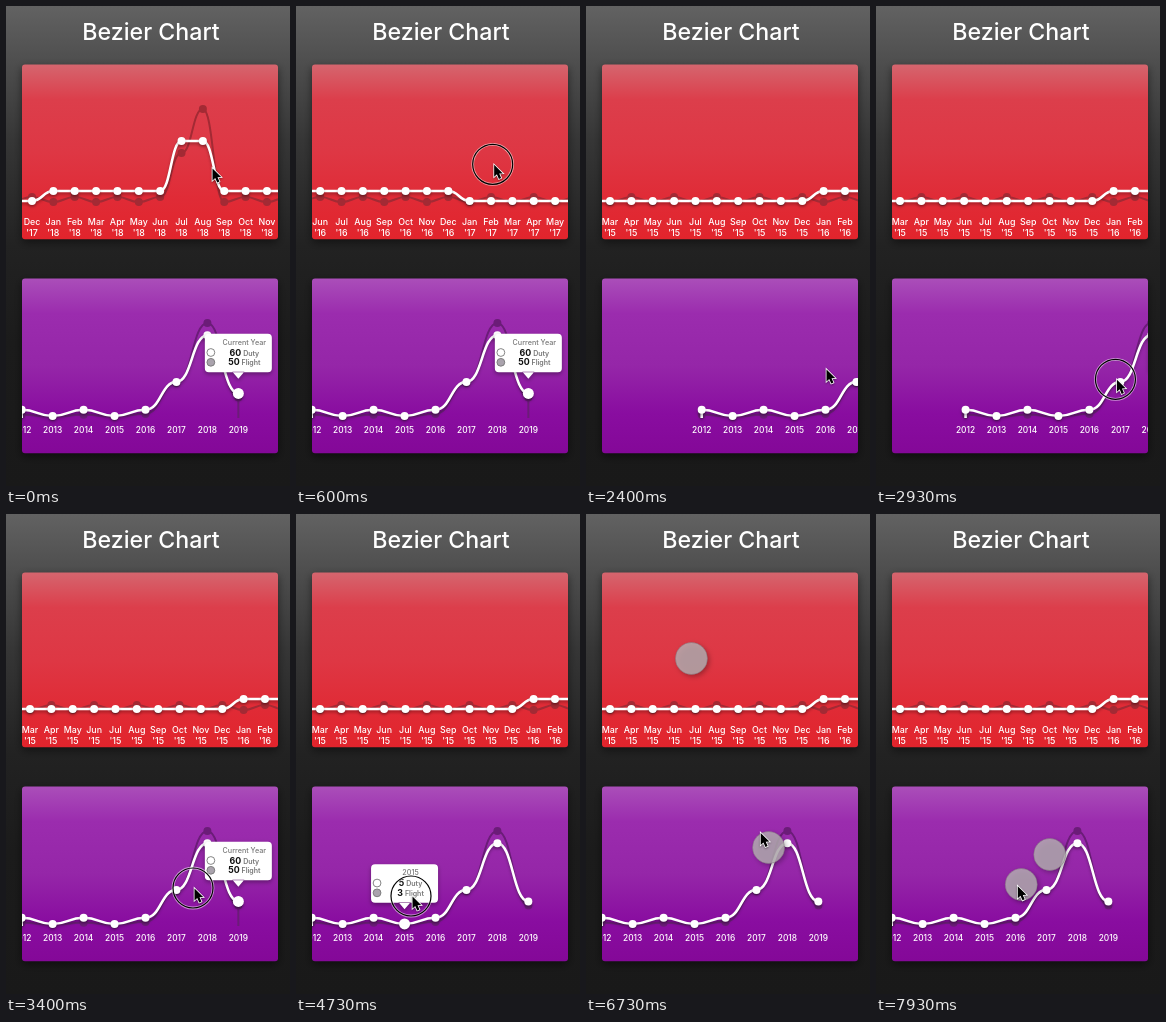
Animation, 284 px wide and 480 px high, one loop 8000 ms. Source, as an HTML page with a canvas:

```html
<!DOCTYPE html>
<html lang="en">
<head>
<meta charset="utf-8">
<title>Bezier Chart</title>
<style>
  html, body { margin: 0; width: 100%; height: 100%; overflow: hidden; background: #1b1b1b; }
  canvas { display: block; width: 284px; height: 480px; }
</style>
</head>
<body>
<canvas id="stage"></canvas>
<script>
const W = 284, H = 480, LOOP = 8000;
const canvas = document.getElementById('stage');
const ctx = canvas.getContext('2d');
const scale = window.devicePixelRatio || 1;
canvas.width = W * scale;
canvas.height = H * scale;

const FONT = 'Inter, Roboto, sans-serif';
const MONTHS = 'Jan Feb Mar Apr May Jun Jul Aug Sep Oct Nov Dec'.split(' ');

const mix = (a, b, u) => a + (b - a) * u;
const progress = (t, from, to) => Math.min(1, Math.max(0, (t - from) / (to - from)));
const ease = (t, from, to) => {
  const u = progress(t, from, to);
  return u * u * (3 - 2 * u);
};

// Two swipes over the months, then eased moves between a few spots
const SWIPE = 656.7, SWIPE_END = 2 * SWIPE, HOLD = 130;
const MOVES = [
  { from: 1470, to: 1800, x: 140, y: 373 },
  { from: 1850, to: 2200, x: 239, y: 363, pressed: true },
  { from: 2450, to: 2650, x: 262, y: 373 },
  { from: 2720, to: 3300, x: 187, y: 374, pressed: true },
  { from: 3670, to: 4700, x: 115, y: 382, pressed: true },
  { from: 4870, to: 5130, x: 197, y: 333 },
  { from: 5270, to: 6270, x: 191, y: 347 },
  { from: 6560, to: 7000, x: 138, y: 262 },
  { from: 7270, to: 7560, x: 164, y: 366 },
  { from: 7560, to: 8130, x: 131, y: 374 }
];

function pointerAt(t) {
  const swing = Math.min(t, SWIPE_END) / SWIPE;
  let x = 145 + 60 * Math.cos(2 * Math.PI * swing);
  let y = 162 - 4 * swing;
  for (const m of MOVES) {
    const u = ease(t, m.from, m.to);
    x = mix(x, m.x, u);
    y = mix(y, m.y, u);
  }
  return { x, y };
}

function isPressed(t) {
  if (t < SWIPE_END + HOLD) return t > SWIPE_END || t % SWIPE > SWIPE / 2;
  return MOVES.some(m => m.pressed && t >= m.from && t < m.to + HOLD);
}

const monthScroll = t => mix(-18.7, -721.6, (1 - progress(t, 250, 1330)) ** 2);
const yearScroll = t => 100 * (ease(t, 1850, 2200) - ease(t, 2720, 3350));

const months = Array.from({ length: 48 }, (_, i) => i);
const monthDuty = i => i === 42 || i === 43 ? 135 : Math.floor(i / 12) % 2 ? 185 : 195;
const monthFlight = i => i === 42 ? 147 : i === 43 ? 103 : i % 2 ? 191 : 196;

const DUTY = [20, 5, 20, 5, 20, 88, 202, 60];
const FLIGHT = [8, 3, 8, 3, 10, 85, 232, 50];
const yearHeight = value => 412 - 0.41 * value;

const redCard = {
  top: 58.6, base: 198, step: 21.36, dark: '#a32a34',
  stops: ['#d5656e', '#dc3e4b', '#de3744', '#e02b36', '#e2242c'],
  duty: months.map(monthDuty),
  flight: months.map(monthFlight),
  label(i, x) {
    text(MONTHS[i % 12], x, 219.4, 8.9, 500);
    text("'" + (15 + Math.floor(i / 12)), x, 229.5, 8.9, 500);
  }
};
const purpleCard = {
  top: 272.6, base: 412, step: 30.95, dark: '#6b1c78',
  stops: ['#aa4eb9', '#9b2cae', '#9526a8', '#890da0', '#840898'],
  duty: DUTY.map(yearHeight),
  flight: FLIGHT.map(yearHeight),
  label: (i, x) => text(2012 + i, x, 426.6, 8.4, 500)
};

function text(str, x, y, size, weight = 400, color = '#fff', align = 'center') {
  ctx.font = `${weight} ${size}px ${FONT}`;
  ctx.textAlign = align;
  ctx.fillStyle = color;
  ctx.fillText(str, x, y);
}

function shadow(alpha, blur, dy, dx = 0) {
  ctx.shadowColor = `rgba(0,0,0,${alpha})`;
  ctx.shadowBlur = blur * scale;
  ctx.shadowOffsetX = dx * scale;
  ctx.shadowOffsetY = dy * scale;
}
const noShadow = () => { ctx.shadowColor = 'transparent'; };

function box(x, y, w, h, r) {
  ctx.beginPath();
  ctx.roundRect(x, y, w, h, r);
}

function ring(color, width) {
  ctx.strokeStyle = color;
  ctx.lineWidth = width;
  ctx.stroke();
}

function disc(x, y, r, color) {
  ctx.beginPath();
  ctx.arc(x, y, r, 0, Math.PI * 2);
  ctx.fillStyle = color;
  ctx.fill();
}

function vertical(y0, y1, stops, places) {
  const g = ctx.createLinearGradient(0, y0, 0, y1);
  stops.forEach((c, i) => g.addColorStop(places[i], c));
  return g;
}

function series(card, x0, ys, color, width) {
  ctx.beginPath();
  ctx.moveTo(x0, card.base);
  ctx.lineTo(x0, ys[0]);
  for (let i = 1; i < ys.length; i++) {
    const x = x0 + i * card.step, mid = x - card.step / 2;
    ctx.bezierCurveTo(mid, ys[i - 1], mid, ys[i], x, ys[i]);
  }
  ring(color, width);
  ys.forEach((y, i) => {
    const x = x0 + i * card.step;
    if (x > 0 && x < W) disc(x, y, 4, color);
  });
}

function tooltip(i, x, y) {
  const left = x - 33.5, top = y - 59.7, mid = x + 6;
  ctx.fillStyle = '#fff';
  shadow(0.35, 4, 2);
  box(left, top, 67, 38.5, 4);
  ctx.moveTo(x - 6, top + 38);
  ctx.lineTo(x, top + 45);
  ctx.lineTo(x + 6, top + 38);
  ctx.fill();
  noShadow();
  text(i === 7 ? 'Current Year' : 2012 + i, mid, top + 11.2, 7.2, 500, '#777');
  [[DUTY[i], 'Duty', '#fff'], [FLIGHT[i], 'Flight', '#aaa3ad']].forEach(([n, name, fill], row) => {
    const cy = top + 18.8 + row * 9.8;
    disc(left + 6, cy, 3.9, fill);
    ring('#777', 0.9);
    ctx.font = `700 8.8px ${FONT}`;
    const wn = ctx.measureText(n).width;
    ctx.font = `600 7px ${FONT}`;
    const start = mid - (wn + 2 + ctx.measureText(name).width) / 2;
    text(n, start, cy + 3.1, 8.8, 700, '#111', 'left');
    text(name, start + wn + 2, cy + 3.1, 7, 600, '#777', 'left');
  });
}

function drawCard(card, x0, selected = -1) {
  ctx.save();
  shadow(0.5, 8, 3);
  ctx.fillStyle = vertical(card.top, card.top + 175, card.stops, [0, 0.2, 0.5, 0.77, 1]);
  box(16, card.top, 256, 174.6, 3);
  ctx.fill();
  noShadow();
  ctx.clip();

  series(card, x0, card.flight, card.dark, 2);
  const sx = x0 + selected * card.step, sy = card.duty[selected];
  if (selected >= 0) {
    ctx.fillStyle = card.dark;
    ctx.fillRect(sx - 1, sy, 2, card.base - sy);
  }
  shadow(0.3, 3, 2);
  series(card, x0, card.duty, '#fff', 2.6);
  if (selected >= 0) disc(sx, sy, 5.5, '#fff');
  noShadow();
  card.duty.forEach((_, i) => {
    const x = x0 + i * card.step;
    if (x > 0 && x < W) card.label(i, x);
  });
  if (selected >= 0) tooltip(selected, sx, sy);
  ctx.restore();
}

function drawPress({ x, y }) {
  ctx.beginPath();
  ctx.arc(x, y, 20, 0, Math.PI * 2);
  ring('rgba(255,255,255,.55)', 2.8);
  ring('#000', 1.2);
}

function drawPointer({ x, y }) {
  ctx.save();
  ctx.translate(x + 1.5, y + 0.5);
  ctx.scale(0.88, 0.88);
  ctx.beginPath();
  [[0, 0], [0, 13.6], [3.1, 10.8], [5.4, 16], [7.9, 14.9], [5.7, 9.9], [9.8, 9.7]]
    .forEach(([px, py]) => ctx.lineTo(px, py));
  ctx.closePath();
  shadow(0.4, 2, 1);
  ring('#fff', 1.8);
  noShadow();
  ctx.fillStyle = '#000';
  ctx.fill();
  ctx.restore();
}

function drawFinger(x, y) {
  shadow(0.35, 5, 2, 2);
  disc(x, y, 16, 'rgba(182,176,180,.82)');
  noShadow();
  ring('rgba(130,120,126,.5)', 1);
}

// The two touches mirror each other around a centre that is dragged down late
function drawPinch(t) {
  const u = ease(t, 7270, 7700);
  const cx = mix(144, 159.5, u), cy = mix(239, 355.5, u);
  const { x, y } = pointerAt(t - 60);
  drawFinger(2 * cx - x, 2 * cy - y);
  drawFinger(x, y);
}

function selectedYear(t, x0) {
  if (t < 3670) return 7;
  if (t >= 5270) return -1;
  return Math.round((pointerAt(Math.min(t, 4800)).x - x0) / purpleCard.step);
}

function draw(t) {
  const pointer = pointerAt(t);
  const yearX = 15.7 + yearScroll(t);

  ctx.setTransform(scale, 0, 0, scale, 0, 0);
  ctx.fillStyle = vertical(0, H,
    ['#626262', '#4c4c4c', '#363636', '#222', '#1b1b1b', '#191919'],
    [0, 0.13, 0.28, 0.5, 0.7, 1]);
  ctx.fillRect(0, 0, W, H);
  text('Bezier Chart', 145, 33.5, 23.2, 500);

  drawCard(redCard, monthScroll(t));
  drawCard(purpleCard, yearX, selectedYear(t, yearX));
  if (t >= 5600) drawPinch(t);
  if (isPressed(t)) drawPress(pointer);
  drawPointer(pointer);
}

const begin = performance.now();
function tick() {
  draw((performance.now() - begin) % LOOP);
  requestAnimationFrame(tick);
}
tick();
</script>
</body>
</html>
```
